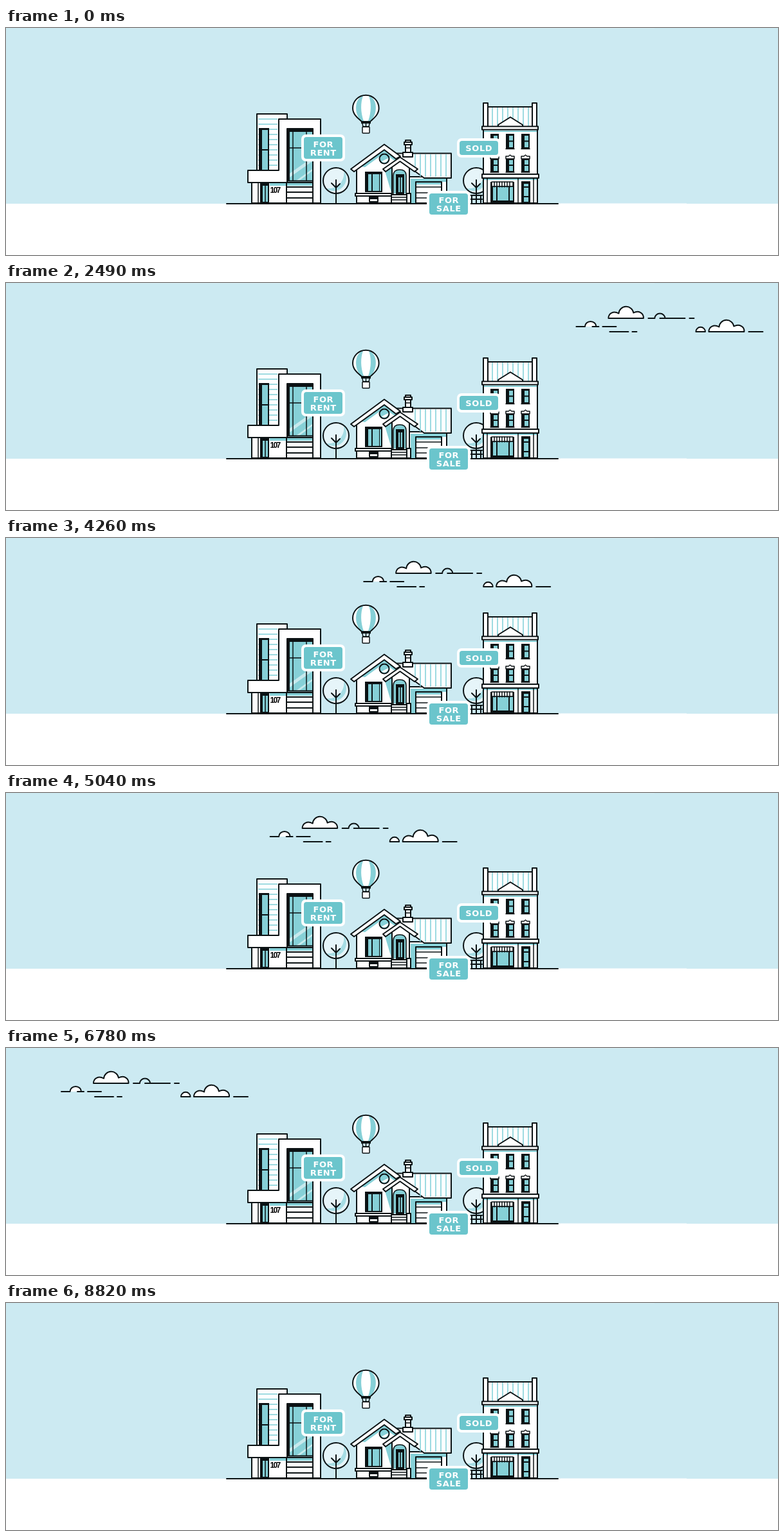
Animation, 1200 px wide and 354 px high, one loop 9000 ms. Source, as an HTML page:

```html
<!DOCTYPE html>
<html lang="en">
<head>
<meta charset="utf-8">
<title>Street with passing clouds</title>
<style>
  html, body { margin: 0; width: 100%; height: 100%; overflow: hidden; background: #cceaf2; }
  svg { display: block; width: 100vw; height: 100vh; }
  .ink { stroke: #0b1214; stroke-width: 2; stroke-linejoin: round; }
  .line { fill: none; stroke-linecap: round; }
  .thin { stroke-width: 1.5; }
  .w { fill: #fff; }
  .t { fill: #86d0d7; }
  .k { fill: #0b1214; }
  .teal { fill: none; stroke: #86d2da; stroke-width: 1.6; }
  .sign text { font: bold 13px "DejaVu Sans", sans-serif; letter-spacing: 0.6px; fill: #fff; text-anchor: middle; }
  .number { font: bold 12px "Liberation Sans", sans-serif; letter-spacing: -1.7px; }
</style>
</head>
<body>
<svg viewBox="0 0 1200 354" preserveAspectRatio="none">
  <rect width="1200" height="354" fill="#cceaf2"/>
  <path d="M192 0H1008V1H192Z" fill="#d5edf3"/>
  <path d="M0 274H858V273.500H1058V274H1200V354H0Z" fill="#fff"/>
  <g id="clouds"></g>
  <g id="town"></g>
</svg>
<script>
const LOOP = 9000, STEP = 30, SPEED = 0.18658, ENTRY = 804;
const clouds = document.getElementById('clouds');
const town = document.getElementById('town');

const shape = (cls, d) => `<path class="${cls}" d="${d}"/>`;
const box = (cls, x1, y1, x2, y2, rx = 0) =>
  `<rect class="${cls}" x="${x1}" y="${y1}" width="${x2 - x1}" height="${y2 - y1}" rx="${rx}"/>`;
const disc = (cls, x, y, r) => `<circle class="${cls}" cx="${x}" cy="${y}" r="${r}"/>`;
const ink = d => shape('ink line', d);
const thin = d => shape('ink line thin', d);
const faint = d => `<path class="w" d="${d}" opacity=".55"/>`;
const repeat = (from, to, gap, draw) => {
  let out = '';
  for (let v = from; v <= to; v += gap) out += draw(v);
  return out;
};

function sash(x, y, h, w = 11) {
  const mid = y + h / 2;
  return box('k', x - 1, y - 1, x + w + 1, y + h + 1) +
    box('t', x + 4, y + 2, x + w - 1, mid - 1) +
    box('t', x + 4, mid + 1, x + w - 1, y + h - 1);
}

function sign(x1, y1, x2, y2, lines) {
  const cx = (x1 + x2) / 2 + 0.3;
  const text = lines.map(([word, y]) => `<text x="${cx}" y="${y}">${word}</text>`).join('');
  return `<g class="sign">${box('w', x1 - 4, y1 - 4, x2 + 4, y2 + 4, 7)}` +
    `<rect x="${x1}" y="${y1}" width="${x2 - x1}" height="${y2 - y1}" rx="4" fill="#6bc5cc"/>${text}</g>`;
}

function tree(x) {
  return `<circle cx="${x}" cy="238" r="20" fill="#e6f5f9"/>` +
    `<path d="M${x + 12} 222A20 20 0 0 1 ${x - 16} 250A24 24 0 0 0 ${x + 12} 222Z" fill="#a6dde4"/>` +
    disc('ink line', x, 238, 20) +
    ink(`M${x} 237V273M${x - 7} 242L${x} 249L${x + 6} 243`);
}

function balloon() {
  const body = 'M553 146C549 142 539 136 539 125A20.3 20.3 0 0 1 579.6 125C579.6 136 570 142 566 146Z';
  return shape('w', body) +
    shape('t', 'M555 106C541 110 541 134 552 145H556C551 132 551 116 555 106Z') +
    shape('t', 'M564 106C578 110 578 134 567 145H563C568 132 568 116 564 106Z') +
    shape('ink line', body) + box('k', 552, 145, 567, 149) +
    thin('M554 149L555 154M565 149L564 154M559.5 149V154') +
    box('ink w thin', 554, 154, 565, 164, 1) + box('k', 554, 153, 565, 155);
}

function modernHouse() {
  return box('ink w', 390, 134, 437, 273) +
    repeat(142, 220, 8, y => shape('teal', `M392 ${y}H422`)) +
    box('k', 393, 156, 409, 222) + box('t', 398, 159, 407, 189) + box('t', 398, 191, 407, 222) +
    box('ink w', 382, 241, 477, 273) +
    box('t', 410, 242, 476, 246) +
    box('k', 395, 241, 409, 273) + box('t', 399, 246, 407, 271) + thin('M403 246V272M392 241V273') +
    ink('M436 241V273M437 248H477M437 256H477M437 265H477') +
    '<text class="number" x="410.5" y="257">107</text>' +
    shape('ink w', 'M424 142H489V273H477V157H437V241H376V222H424Z') +
    box('t', 438, 158, 476, 238) +
    faint('M438 229L476 202V208L438 235Z') + faint('M451 238L476 220V223L456 238Z') +
    box('k', 437, 157, 477, 162) + box('k', 437, 157, 441, 238) +
    thin('M446 161V238M467 161V238M438 187H476') + ink('M437 238.500H477');
}

function cottage() {
  const garage = box('ink w', 627, 232, 685, 273) + box('t', 629, 235, 684, 240) +
    box('t', 629, 239, 637, 273) + box('ink w', 637, 240, 677, 273) +
    box('t', 638, 241, 676, 244) + thin('M638 248H676M638 257H676M638 265H676') +
    shape('ink w', 'M598 195.500H692V234H650Z') +
    repeat(636, 688, 8, x => shape('teal', `M${x} 197V${x < 640 ? 216 : 232}`));
  const chimney = box('ink w', 621, 175, 629, 196) + box('ink w', 619, 178, 631, 182) +
    thin('M621 187H629') + box('ink w', 617, 194, 632, 201);
  const front = shape('ink w', 'M545 273V214L588 184L627 213V273Z') +
    shape('t', 'M588 220L600 212V260Z') +
    shape('t', 'M552 216L588 190L616 211L613 214L588 195L558 217Z') +
    disc('ink t', 588, 204, 7.5) + shape('w', 'M584 208A6 6 0 0 0 594 203Z') +
    box('k', 558, 224, 585, 256) + box('t', 563, 228, 568, 254) +
    box('t', 570, 228, 580, 254) + box('t', 581, 228, 583, 254) +
    box('ink w', 543, 258, 601, 262) + box('ink w', 565, 263, 578, 271) + box('k', 566, 264, 577, 267);
  const roof = shape('ink w', 'M536 220L588 181.500L613 200L606 204L588 190L541 224Z');
  const porch = shape('ink w', 'M600 260V216L613 207L627 217V273H600Z') +
    shape('t', 'M602 258V230Q602 221 612 221Q622 221 622 230V258Z') +
    thin('M602 259V230Q602 221 612 221Q622 221 622 230V259') +
    box('k', 606, 228, 619, 259) + box('t', 610, 233, 616, 256) + thin('M613 233V257') +
    shape('ink w', 'M586 220L612.500 201.500L640 220L635 224L612.500 208L590 224Z') +
    box('ink w', 599, 260, 625, 273) + thin('M600 264H624M600 268H624') +
    box('ink w', 623, 258, 629, 273);
  return garage + chimney + front + roof + porch;
}

function townhouse() {
  const columns = [754, 778, 802];
  const top = box('ink w', 749, 123, 818, 154) +
    repeat(756, 815, 8, x => shape('teal', `M${x} 124V153`)) +
    box('ink w', 742, 117, 749, 154) + box('ink w', 818, 117, 825, 154) +
    shape('ink w', 'M765 151L784 139L803 151V154H765Z');
  const body = box('ink w', 742, 157, 826, 273) + box('t', 743, 160, 825, 162) +
    box('ink w', 740, 153.500, 827, 158.500);
  const windows = columns.map(x => sash(x, 166, 21) + sash(x, 204, 20) +
    shape('ink w thin', `M${x - 1} 204V200H${x + 3}L${x + 5.5} 198L${x + 8} 200H${x + 12}V204Z`) +
    thin(`M${x - 1} 188.500H${x + 12}M${x - 1} 225H${x + 12}`)).join('');
  const shop = box('ink w', 740, 228, 828, 234) + box('t', 743, 235, 825, 237) +
    thin('M748 235V273M796 235V273M820 235V273') +
    box('k', 753, 240, 790, 272) + box('t', 757, 248, 762, 269) +
    box('t', 764, 248, 781, 269) + box('t', 783, 248, 788, 269) +
    box('ink w thin', 755, 240, 788, 247) +
    repeat(759, 786, 4, x => thin(`M${x} 240V248`)) +
    box('k', 801, 239, 815, 273) + box('t', 805, 243, 812, 247) +
    box('t', 805, 249, 812, 262) + box('t', 805, 264, 812, 271);
  return top + body + windows + shop;
}

function drawTown() {
  const bench = ink('M721 261H740M721 267H740M724 261V273M738 261V273');
  town.innerHTML = balloon() + tree(513) + tree(731) + bench +
    modernHouse() + cottage() + townhouse() + ink('M343 274H858') +
    sign(463, 170, 523, 204, [['FOR', 186], ['RENT', 198.5]]) +
    sign(705, 176, 765, 198, [['SOLD', 192]]) +
    sign(658, 258, 718, 291, [['FOR', 273], ['SALE', 285.5]]);
}

// Coordinates run from the left tip of the group.
function drawClouds() {
  const puff = d => shape('ink w', d);
  clouds.innerHTML =
    puff('M51 55C51 47 59 43 67 47.500A11.600 11.600 0 0 1 90 46.500C98 42 106 47 105.500 55Z') +
    puff('M207 76C207 68 215 64 223 68.500A11.600 11.600 0 0 1 246 67.500C254 63 263 68 262 76Z') +
    puff('M187 76A7.250 7.250 0 0 1 201.500 76Z') +
    shape('w', 'M14.500 68A8.750 8 0 0 1 32 68Z') +
    ink('M1 68H14.500A8.750 8 0 0 1 32 68M26 68H36M42 68H63M53 76H82M88 76H95') +
    ink('M113 55H123A8 7.500 0 0 1 139 55M131 55H170M177 55H184M269 76H291');
}

function render(now) {
  const t = Math.floor((now % LOOP) / STEP) * STEP;
  clouds.setAttribute('transform', `translate(${1200 - (t - ENTRY) * SPEED} 0)`);
}

drawTown();
drawClouds();
const start = performance.now();
function tick() {
  render(performance.now() - start);
  requestAnimationFrame(tick);
}
tick();
</script>
</body>
</html>
```
